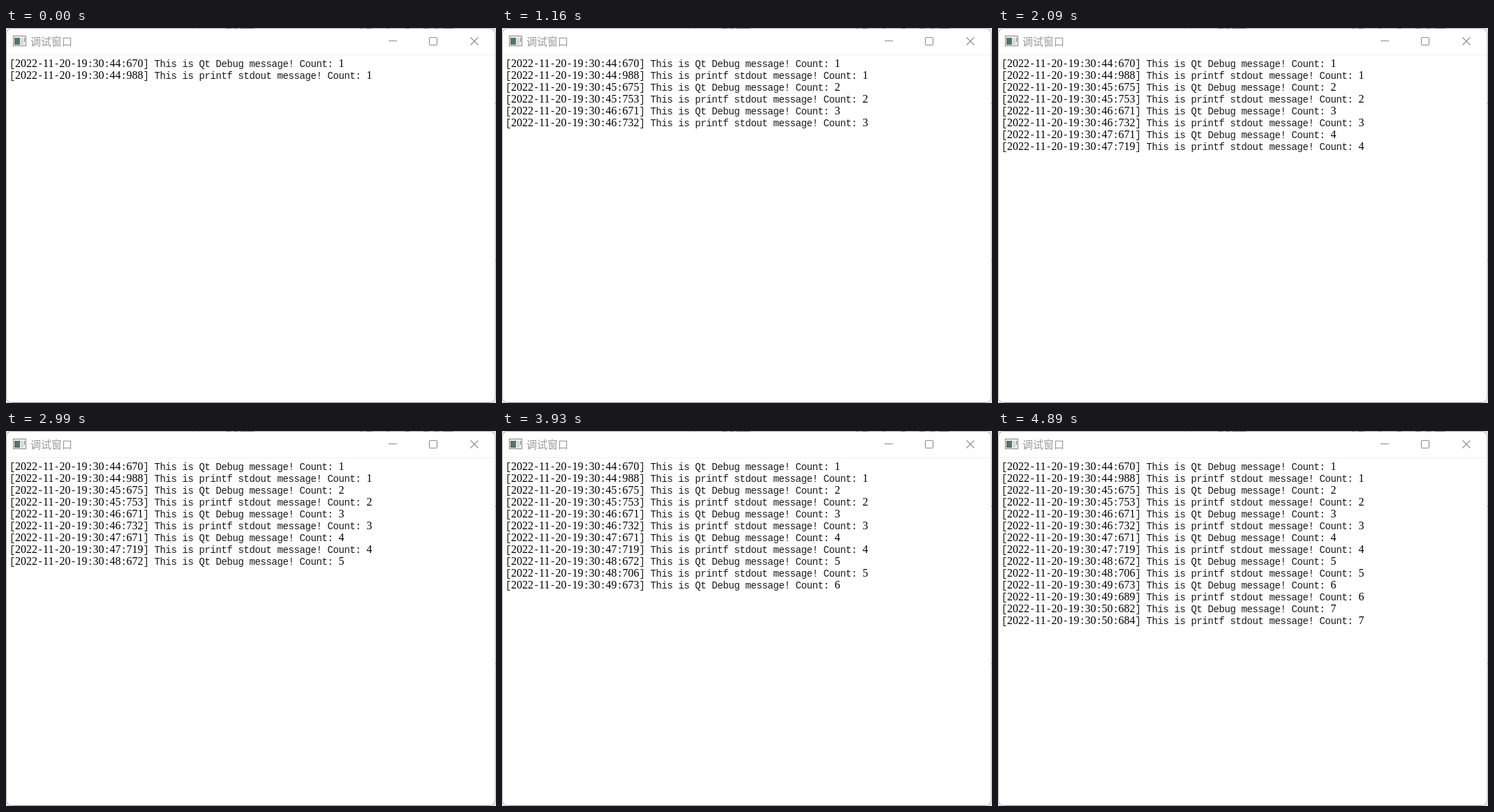
An HTML page for the animation above (5560 ms loop, 702 by 538 pixels).

```html
<!DOCTYPE html>
<html lang="zh-CN">
<head>
<meta charset="utf-8">
<title>调试窗口</title>
<style>
html, body { margin: 0; width: 100%; height: 100%; overflow: hidden; background: #fff; }
svg { position: absolute; left: 0; top: 0; display: block; }
.title { font: 15px "Noto Sans CJK SC", "Noto Sans CJK", sans-serif; fill: #999; }
.log {
  --row: 17px;
  position: absolute; left: 5px; top: 44px; margin: 0;
  overflow: hidden;
  font: 14px/17px "Liberation Mono", "Courier New", monospace;
  letter-spacing: -.4px;
  color: #1a1a1a;
  animation: print 5560ms step-end infinite;
}
/* Serif digits are half an em wide, so they keep the 8px grid. */
.num { font: 16px/0 "Liberation Serif", "Times New Roman", serif; letter-spacing: 0; color: #000; }
/* Each message appears when its row is uncovered. */
@keyframes print {
  0% { height: calc(2 * var(--row)); }
  3.237% { height: calc(3 * var(--row)); }
  4.316% { height: calc(4 * var(--row)); }
  19.784% { height: calc(5 * var(--row)); }
  20.863% { height: calc(6 * var(--row)); }
  36.69% { height: calc(7 * var(--row)); }
  37.589% { height: calc(8 * var(--row)); }
  53.776% { height: calc(9 * var(--row)); }
  54.316% { height: calc(10 * var(--row)); }
  70.683% { height: calc(11 * var(--row)); }
  71.043% { height: calc(12 * var(--row)); }
  87.949%, 100% { height: calc(14 * var(--row)); }
}
</style>
</head>
<body>
<svg width="702" height="538" viewBox="0 0 702 538">
  <rect width="702" height="538" fill="#e4e4e4"/>
  <rect x=".5" y=".5" width="700.5" height="537" rx="8" fill="#fff" stroke="#b0b0b0"/>
  <path d="M8 537.5H694" stroke="#8c8c8c"/>
  <path d="M277 .5h1M315 .5h8M326 .5h6M336 .5h20M508 .5h3M516 .5h8M546 .5h3M572 .5h6M598 .5h8M614 .5h6M626 .5h15" stroke="#777"/>
  <path d="M701.5 107v2M701.5 333v2" stroke="#999"/>
  <path d="M2 38.5H700" stroke="#f0f0f0"/>
  <g>
    <rect x="10.5" y="11.5" width="18" height="14" fill="#f4f4f4" stroke="#858585"/>
    <rect x="12" y="14" width="8" height="10" fill="#53736b"/>
    <rect x="21" y="14" width="4" height="10" fill="#d5d9d8"/>
    <path d="M26.5 14v6" stroke="#777"/>
  </g>
  <text class="title" x="35" y="25">调试窗口</text>
  <g fill="none" stroke="#8f8f8f" stroke-width="1.1">
    <path d="M548 18.5h12"/>
    <rect x="606.5" y="13.5" width="11" height="11" rx="1.5"/>
    <path d="M665.5 13.5l11 11m0-11l-11 11"/>
  </g>
</svg>
<pre class="log"></pre>
<script>
// Milliseconds of the two messages printed in each second.
const stamps = [[670, 988], [675, 753], [671, 732], [671, 719], [672, 706], [673, 689], [682, 684]];
const kinds = ['Qt Debug', 'printf stdout'];

const lines = stamps.flatMap((pair, i) => pair.map((ms, k) =>
  `[2022-11-20-19:30:${44 + i}:${ms}] This is ${kinds[k]} message! Count: ${i + 1}`));

document.querySelector('.log').innerHTML =
  lines.join('\n').replace(/\d+/g, '<span class="num">$&</span>');
</script>
</body>
</html>
```
